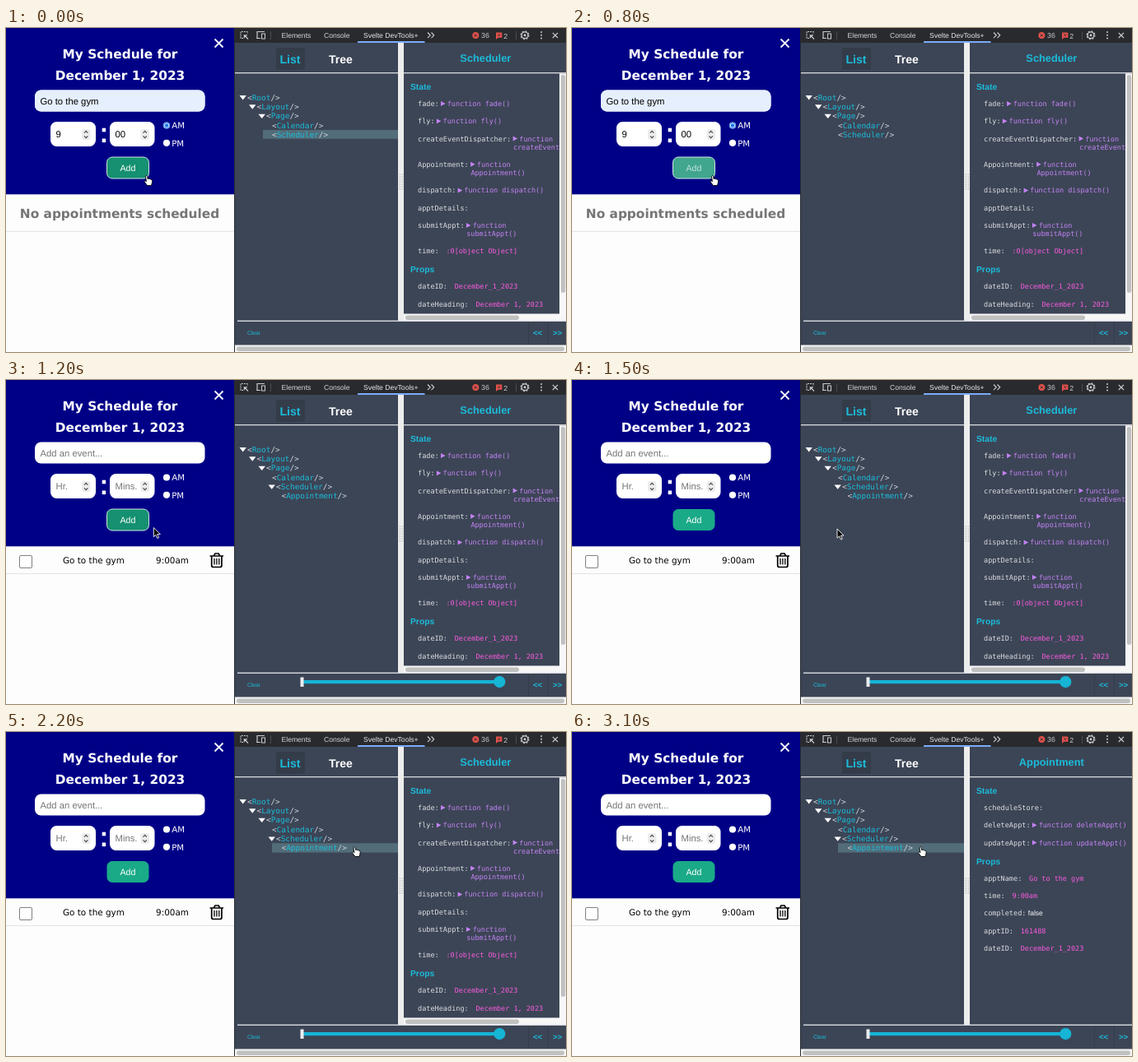
An HTML page that plays this animation: 680 by 394 pixels, repeating every 3.6 s.

```html
<!DOCTYPE html>
<html lang="en">
<head>
<meta charset="utf-8">
<title>Schedule and component inspector</title>
<style>
html, body { margin: 0; width: 100%; height: 100%; overflow: hidden; background: #3c4556; }
svg { display: block; width: 680px; height: 394px; text-rendering: geometricPrecision; }
text { white-space: pre; }
.v { font-family: "DejaVu Sans", Verdana, sans-serif; }
.a { font-family: "Liberation Sans", Arial, sans-serif; }
.m { font-family: "DejaVu Sans Mono", Menlo, monospace; }
.b { font-weight: bold; }
.mid { text-anchor: middle; }
</style>
</head>
<body>
<svg id="stage" viewBox="0 0 680 394"></svg>
<script>
const CYAN = '#1bbcda', PURPLE = '#c583f5', PINK = '#fb5bdf', LABEL = '#dcdde0';
const stage = document.getElementById('stage');

const rect = (x, y, w, h, fill, more = '') =>
  `<rect x="${x}" y="${y}" width="${w}" height="${h}" fill="${fill}" ${more}/>`;
const text = (x, y, size, cls, fill, str) =>
  `<text x="${x}" y="${y}" font-size="${size}" class="${cls}" fill="${fill}">${str.replace(/</g, '&lt;')}</text>`;
const line = (d, stroke, width = 1, more = '') =>
  `<path d="${d}" fill="none" stroke="${stroke}" stroke-width="${width}" ${more}/>`;
const shape = (d, fill) => `<path d="${d}" fill="${fill}"/>`;
const dot = (x, y, r, fill, more = '') => `<circle cx="${x}" cy="${y}" r="${r}" fill="${fill}" ${more}/>`;
const group = (id, body) => `<g id="${id}">${body}</g>`;

// Page on the left
const spinner = x =>
  rect(x, 123, 10.5, 13, '#ececec', 'rx="3"') +
  line(`M${x + 3} 127.6l2.2-2.2 2.2 2.2M${x + 3} 131.4l2.2 2.2 2.2-2.2`, '#444', 1.1);

const field = (x, y, w, h) => rect(x, y, w, h, '#fff', 'rx="7.5"');

function page() {
  return rect(0, 0, 277, 394, '#fdfdfd') + rect(0, 0, 277, 202.3, '#000087') +
    line('M253.5 13.5l10 10m0-10l-10 10', '#fff', 1.8) +
    text(138.5, 37, 15.35, 'v b mid', '#fff', 'My Schedule for') +
    text(138.5, 62.5, 15.35, 'v b mid', '#fff', 'December 1, 2023') +
    field(35, 75.5, 206.5, 26) + field(54, 114, 55, 30) + field(126, 114, 54.5, 30) +
    rect(116.7, 121.7, 4.4, 4.6, '#fff') + rect(116.7, 134.5, 4.4, 4.6, '#fff') +
    dot(195, 118.5, 4.1, '#fff') + dot(195, 139.8, 4.1, '#fff') +
    text(201.2, 122.3, 10.2, 'v', '#fff', 'AM') + text(201.2, 143.6, 10.2, 'v', '#fff', 'PM') +
    group('filled',
      rect(35, 75.5, 206.5, 26, '#e6effd', 'rx="7.5"') +
      text(41.5, 92.5, 11.3, 'a', '#000', 'Go to the gym') +
      text(60.5, 133.3, 11.3, 'a', '#000', '9') +
      text(132.5, 133.3, 11.3, 'a', '#000', '00') +
      dot(195, 118.5, 3.6, '#fff', 'stroke="#1a73e8" stroke-width="1"') + dot(195, 118.5, 2.2, '#1a73e8') +
      text(138, 231.2, 15.35, 'v b mid', '#757575', 'No appointments scheduled') +
      line('M0 247.3H277', '#e2e2e2')) +
    group('empty',
      text(41.5, 92.5, 11.3, 'a', '#757575', 'Add an event...') +
      text(60.5, 133.3, 11.3, 'a', '#757575', 'Hr.') +
      text(132.5, 133.3, 11.3, 'a', '#757575', 'Mins.')) +
    spinner(92) + spinner(163.5) +
    group('entry',
      rect(16.5, 213.5, 15, 15, '#fff', 'rx="1.5" stroke="#808080"') +
      text(69, 223.2, 10.43, 'v', '#000', 'Go to the gym') +
      text(182, 223.2, 10.43, 'v', '#000', '9:00am') +
      line('M247.5 214H264M252.5 213.5l1.5-2.5h4l1.5 2.5M249.7 214.5V225.5q0 2 2 2h8.200q2 0 2-2V214.5', '#000', 1.7) +
      line('M253 217V224.500M255.900 217V224.500M258.800 217V224.500', '#000', 1.3) +
      line('M0 235.5H277', '#e2e2e2')) +
    rect(122.5, 157, 51, 26, '#159070', 'id="button" rx="6.5"') +
    `<text id="add" x="148" y="173.500" font-size="10.700" class="a mid" fill="#fff">Add</text>`;
}

// Browser tool strip
function toolbar() {
  const grey = '#c9cbcf';
  return rect(277, 0, 403, 18, '#292a2d') +
    line('M288 12.500H285V4.500H293V7', grey, 1.1, 'stroke-dasharray="2 1"') +
    line('M294 13.500l-4.500-4.500M289.300 12.300V8.800H293', grey, 1.2) +
    line('M305 12V4.500H314M304 12.500H309', grey, 1.2) + rect(310.500, 7, 4, 6, 'none', `stroke="${grey}"`) +
    line('M321.500 4V14M619.500 4V14', '#4a4c50') +
    text(334.500, 11.800, 8.600, 'a', '#d5d7da', 'Elements') +
    text(386, 11.800, 8.600, 'a', '#d5d7da', 'Console') +
    text(434, 11.800, 8.600, 'a', '#e4e8ee', 'Svelte DevTools+') +
    rect(427, 16, 81.500, 2, '#7cacf8') +
    line('M512 5.500l3.200 3.300-3.200 3.300M516.500 5.500l3.200 3.300-3.200 3.300', grey, 1.200) +
    dot(570.300, 9, 4, '#e4524b') + line('M568.700 7.400l3.200 3.200m0-3.200l-3.200 3.200', '#292a2d', 1) +
    text(577, 12.300, 8.800, 'a', grey, '36') +
    shape('M595 5.500H602.300V11.800H597.500L595 14Z', '#e4524b') +
    line('M597.200 7.200l2.800 2.800m0-2.800l-2.800 2.800', '#292a2d', .9) +
    text(604.300, 12.500, 8.800, 'a', grey, '2') +
    dot(630, 8.800, 3.900, 'none', `stroke="${grey}" stroke-width="1.300"`) +
    dot(630, 8.800, 4.900, 'none', `stroke="${grey}" stroke-width="1.200" stroke-dasharray="1.900 1.950"`) +
    dot(630, 8.800, 1.500, grey) +
    [5, 8.800, 12.600].map(y => dot(650, y, 1, grey)).join('') +
    line('M663.800 5.800l6.200 6.200m0-6.200l-6.200 6.200', grey, 1.200);
}

// Component tree
function node(depth, row, name, open) {
  const x = [293, 304.5, 316, 323, 328, 334.500][depth], y = 87.700 + row * 11.350;
  const tag = `<text x="${x}" y="${y}" font-size="9.430" class="m" fill="#cfd6de">&lt;` +
    `<tspan fill="${CYAN}">${name}</tspan>/&gt;</text>`;
  return (open ? shape(`M${x - 9.500} ${y - 5.700}h8.400l-4.200 5.400z`, '#fff') : '') + tag;
}

function tree() {
  return rect(328, 24, 35, 27, '#343c4a') +
    text(332.500, 43, 14.100, 'a b', CYAN, 'List') +
    text(392, 43, 14, 'a b', '#fff', 'Tree') +
    rect(278, 54, 198, 1.300, '#d9dce0') +
    rect(312, 124, 164, 10.800, '#526d79', 'id="rowOld"') +
    rect(323, 135.200, 153, 11.400, '#526d79', 'id="rowNew"') +
    node(0, 0, 'Root', 1) + node(1, 1, 'Layout', 1) + node(2, 2, 'Page', 1) + node(3, 3, 'Calendar') +
    group('treeOld', node(3, 4, 'Scheduler')) +
    group('treeNew', node(4, 4, 'Scheduler', 1) + node(5, 5, 'Appointment'));
}

// Property rows; each kind places its value after the label
const CH = 5.150;
function prop(y, label, kind, value = '', more = '') {
  const end = 500 + CH * (label.length + 1);
  let out = text(500, y, 8.550, 'm', LABEL, label + ':');
  if (kind === 'fn') {
    out += shape(`M${end + 2.300} ${y - 6}l5.500 3-5.500 3z`, PURPLE) +
      text(end + 10, y, 8.480, 'm', PURPLE, 'function ' + value);
    if (more) out += text(end + 2.600, y + 10.300, 8.480, 'm', PURPLE, more);
  } else if (kind === 'val') out += text(end + 8.700, y, 8.480, 'm', PINK, value);
  else if (kind === 'bool') out += text(end + 2.300, y, 8.500, 'a', '#fff', value);
  return out;
}
const heading = (y, str) => text(491, y, 10.300, 'a b', CYAN, str);
const title = str => text(582.300, 40.500, 12.800, 'a b mid', CYAN, str);

function details() {
  return rect(483, 54, 197, 1.300, '#d9dce0') +
    group('scheduler', title('Scheduler') +
      '<clipPath id="clip"><path d="M483 55H672V347H483z"/></clipPath><g clip-path="url(#clip)">' +
      heading(75, 'State') +
      prop(95, 'fade', 'fn', 'fade()') +
      prop(116.300, 'fly', 'fn', 'fly()') +
      prop(137.500, 'createEventDispatcher', 'fn', '', 'createEventDispatcher()') +
      prop(168.800, 'Appointment', 'fn', '', 'Appointment()') +
      prop(200.400, 'dispatch', 'fn', 'dispatch()') +
      prop(221.700, 'apptDetails') +
      prop(243, 'submitAppt', 'fn', '', 'submitAppt()') +
      prop(274.300, 'time', 'val', ':0[object Object]') +
      heading(297.300, 'Props') +
      prop(317.200, 'dateID', 'val', 'December_1_2023') +
      prop(338.500, 'dateHeading', 'val', 'December 1, 2023') + '</g>' +
      rect(672, 55.300, 8, 301, '#f7f7f7') + rect(483, 347.500, 197, 8.500, '#f7f7f7') +
      rect(673.800, 57, 5.400, 265, '#c1c1c1', 'rx="2.700"') +
      rect(485, 349.500, 138, 5.400, '#c1c1c1', 'rx="2.700"')) +
    group('appointment', title('Appointment') +
      heading(75, 'State') +
      prop(95, 'scheduleStore') +
      prop(116.300, 'deleteAppt', 'fn', 'deleteAppt()') +
      prop(137.500, 'updateAppt', 'fn', 'updateAppt()') +
      heading(160.500, 'Props') +
      prop(180.700, 'apptName', 'val', 'Go to the gym') +
      prop(202, 'time', 'val', '9:00am') +
      prop(223.200, 'completed', 'bool', 'false') +
      prop(244.500, 'apptID', 'val', '161488') +
      prop(265.800, 'dateID', 'val', 'December_1_2023'));
}

function footer() {
  let grip = '';
  for (let y = 178; y < 199; y += 3) grip += dot(478.300, y, .8, '#b5b5b5') + dot(481.300, y, .8, '#b5b5b5');
  return rect(476, 18, 7, 338, '#ededed') + grip +
    rect(281, 355.600, 399, 1.400, '#d9dce0') +
    line('M634.500 358V385M658.500 358V385', '#343c4a') +
    text(293, 373.300, 6.700, 'a', CYAN, 'Clear') +
    text(640, 374, 9.600, 'a b', CYAN, '<<') + text(664, 374, 9.600, 'a b', CYAN, '>>') +
    group('slider', rect(359, 365, 240, 4.200, '#16b4d5') +
      rect(357.500, 361.500, 4, 11.500, '#e9ecef') + dot(599.300, 367.100, 7.100, '#16b4d5')) +
    rect(278, 385.500, 402, 8.500, '#f7f7f7') +
    rect(280, 387.500, 398, 5.400, '#c1c1c1', 'rx="2.700"') +
    rect(277, 0, 1, 394, '#2a2c33');
}

const cursors =
  group('arrow', '<path d="M0 0V11.200L2.600 8.800 4.500 13 6.300 12.200 4.400 8.100H8Z" fill="#000" stroke="#fff" stroke-width=".9"/>') +
  group('hand', '<path d="M0 1.200C0-.4 2-.4 2.200 1.200L2.700 4.200C3.200 3.200 4.500 3.400 4.700 4.400 5.400 3.700 6.500 4.100 6.600 5 7.500 4.600 8.300 5.200 8.200 6.300L7.800 9 7 12H2L-.9 8.200C-2 6.700-.8 5.700.3 6.700L.9 7.200Z" fill="#fff" stroke="#000" stroke-width=".9"/>');

stage.innerHTML = rect(277, 18, 403, 376, '#3c4556') + page() + toolbar() + tree() + details() + footer() + cursors;

const el = id => document.getElementById(id);
const show = (id, on) => el(id).style.opacity = +on;

// Pointer tip at every 100 ms from 1200 ms on
const path = [[179.300, 179.500], [208, 184.500], [262, 186], [322, 181], [376, 172], [409, 162],
  [418, 155], [421, 152], [422, 147.500], [422, 142], [422, 139.500]];

function draw(now) {
  const t = Math.floor(now % 3600 / 100) * 100;
  const added = t >= 900, overRow = t >= 2100, picked = t >= 2400;
  const pressed = t === 800, hover = t < 1300;

  show('filled', !added);
  show('empty', added);
  show('entry', t >= 1000 ? 1 : added ? .5 : 0);
  show('treeOld', !added);
  show('treeNew', added);
  show('slider', added);
  show('rowOld', t < 800);
  show('rowNew', overRow);
  show('scheduler', !picked);
  show('appointment', picked);

  const button = el('button');
  button.setAttribute('fill', pressed ? '#40a68d' : hover ? '#159070' : '#1aaa88');
  button.setAttribute('stroke', hover ? '#cfe6e4' : 'none');
  el('add').setAttribute('fill', pressed ? '#c4e2dc' : '#fff');

  const hand = t < 1200 || overRow;
  const [x, y] = t < 1200 ? [169.500, 179.500] : path[Math.min((t - 1200) / 100, path.length - 1)];
  show('hand', hand);
  show('arrow', !hand);
  el(hand ? 'hand' : 'arrow').setAttribute('transform', `translate(${x} ${y})`);
}

const start = performance.now();
(function tick() {
  draw(performance.now() - start);
  requestAnimationFrame(tick);
})();
</script>
</body>
</html>
```
